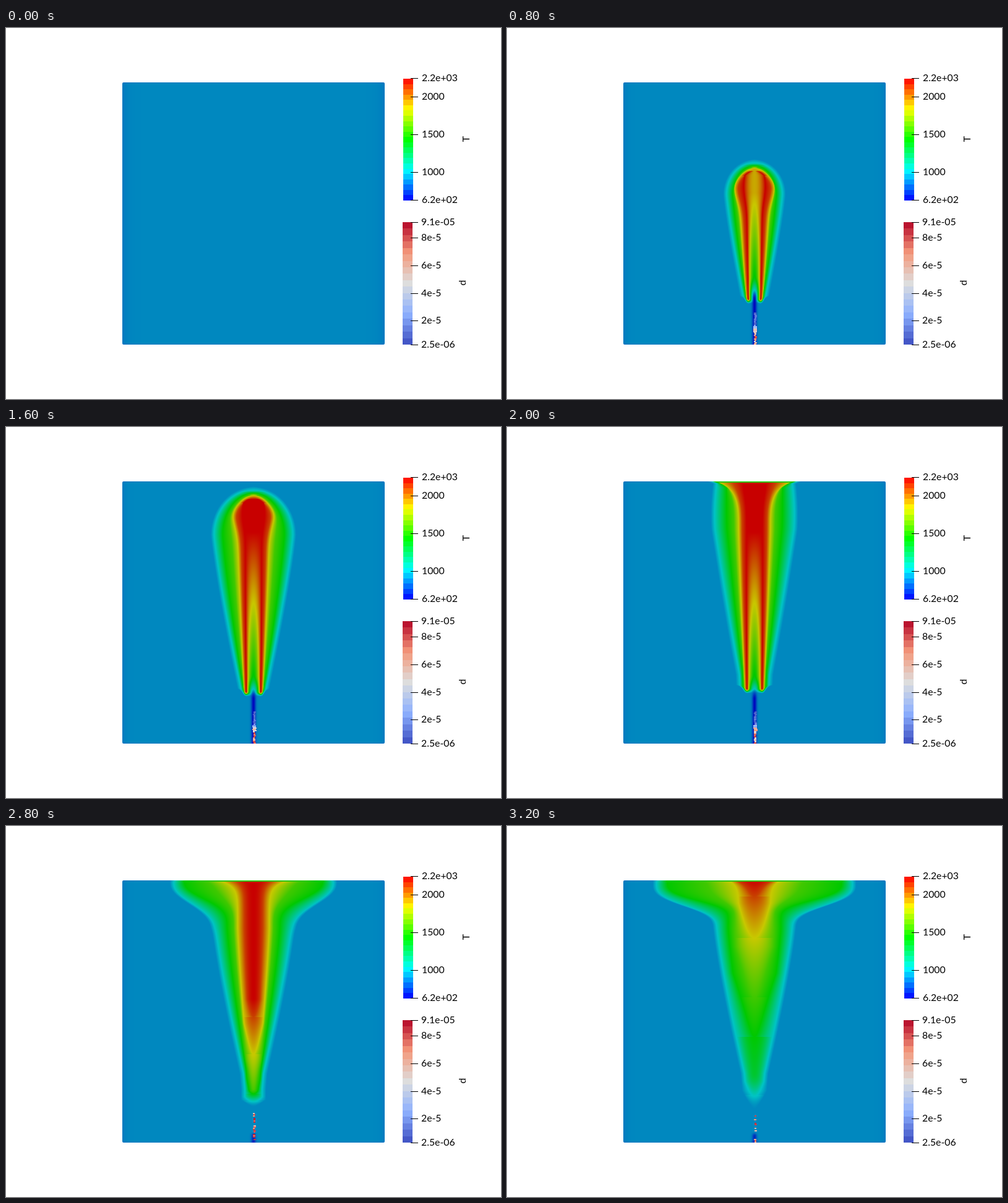
These frames come from a looping animation (800x600 px, 3.4 s). An HTML page with a canvas:

```html
<!DOCTYPE html>
<html lang="en">
<head>
<meta charset="utf-8">
<title>Flame temperature</title>
<style>
  html, body { margin: 0; width: 100%; height: 100%; overflow: hidden; background: #fff; }
  canvas { position: absolute; left: 188px; top: 88px; border-radius: 2px; }
  svg { position: absolute; left: 0; top: 0; }
  text { font: 15.8px Lato, "Open Sans", sans-serif; fill: #000; }
</style>
</head>
<body>
<canvas id="field" width="424" height="424"></canvas>
<svg id="legend" width="800" height="600"></svg>
<script>
const STEP = 200, COUNT = 17, SIZE = 424, LEFT = 188, TOP = 88, BG = 0.17;
const WALL = 9, LIFT = 14; // steps at which the flame meets the wall and leaves the jet

const clamp = (v, a = 0, b = 1) => Math.min(b, Math.max(a, v));
const lerp = (a, b, f) => a + (b - a) * f;
const smooth = (a, b, v) => { const f = clamp((v - a) / (b - a)); return f * f * (3 - 2 * f); };

function interp(xs, ys, x) {
  if (x <= xs[0]) return ys[0];
  for (let i = 1; i < xs.length; i++)
    if (x < xs[i]) return lerp(ys[i - 1], ys[i], (x - xs[i - 1]) / (xs[i] - xs[i - 1]));
  return ys[ys.length - 1];
}

const ramp = (at, colors) => v => [0, 1, 2].map(c => interp(at, colors.map(p => p[c]), v));
const heat = ramp([0, BG, 0.25, 0.5, 0.75, 1],
  [[0, 0, 190], [0, 136, 191], [0, 196, 196], [0, 200, 0], [200, 200, 0], [200, 0, 0]]);
const quarters = [0, 0.25, 0.5, 0.75, 1];
const rainbow = ramp(quarters, [[0, 0, 255], [0, 255, 255], [0, 255, 0], [255, 255, 0], [255, 0, 0]]);
const coolWarm = ramp(quarters, [[59, 76, 192], [141, 176, 254], [221, 221, 221], [244, 152, 122], [180, 4, 38]]);
const css = rgb => `rgb(${rgb.map(Math.round).join(",")})`;
const heatTable = Array.from({ length: 1001 }, (_, i) => heat(i / 1000));

// The rising tip slows down, then carries on past the wall at a steady pace
function tipAt(k) {
  const rise = n => 1 - Math.exp(-0.2 * n);
  return 391 - 289 * rise(Math.min(k, 8) - 1) / rise(7) - 25 * Math.max(0, k - 8);
}

// Value along the axis: falls towards the nozzle, burns out at the end
function axisValue(k, y) {
  const fall = (from, slope, a, b) =>
    lerp(Math.min(1, 1 - (y - from) * slope), BG, smooth(a, b, y));
  if (k < 13) return Math.min(fall(170, 0.00217, 402, 436), 0.55 + 0.06 * k);
  if (k < LIFT) return fall(200, 0.002, 402, 450);
  const burnt = lerp(0.25 + 0.75 * Math.exp((TOP - y) / 230), BG, smooth(400, 460, y));
  return lerp(fall(280, 0.0028, 425, 455), burnt, (k - LIFT) / 2);
}

function cap(y, tip, mid) {
  if (y >= mid) return 1;
  return y <= tip ? 0 : Math.sqrt(1 - ((mid - y) / (mid - tip)) ** 2);
}

// Cross-section of the flame at height y, as distance and value pairs
function section(k, y) {
  const lifted = k >= LIFT, W = k < WALL ? 22.3 * Math.sqrt(k) : 60;
  const tip = tipAt(k);
  const wide = Math.max(tip + 1.15 * W, k < WALL ? 0 : 165);
  const base = lifted ? 425 : Math.max(424, 450 - 2.5 * k);
  const prong = Math.min(12, 7.5 + 0.5 * k);
  const foot = lifted ? 3 : prong;
  const f = clamp((y - wide) / (base - wide)) ** 1.2;
  const head = tip + Math.min(48, W);

  const bulge = Math.min(8, 0.18 * W) * Math.exp(-(((y - tip - 38) / 30) ** 2));
  let red = lerp(Math.min(20, 0.42 * W), foot + 1.5, f) + bulge;
  let yellow = red + lerp(5.5, 2, f);
  let green = lerp((k < WALL ? 0.79 : 0.71) * W, foot + 4, f);
  let cyan = lerp(W, foot + 7, f);
  const inner = red * lerp(0.65, 0.87, f);

  red *= cap(y, tip + 13, head);
  yellow *= cap(y, tip + 9, head);
  green *= cap(y, tip + 5, wide);
  let outer = (cyan + 6) * cap(y, tip - 5, wide);
  cyan *= cap(y, tip, wide);

  if (k >= WALL) {
    const spread = 14 * (k - WALL) + 2, d = y - TOP, n = clamp(0.5 * k - 4.5, 1, 3.5);
    const near = Math.exp(-d / 9);
    red += 5 * Math.min(4, k - 8) * near;
    yellow += 58 * Math.exp(-Math.abs(k - 12) * 0.32) * near;
    green = Math.max(green + spread * Math.exp(-((d / 36) ** n)), yellow + 3);
    cyan = Math.max(cyan + spread * Math.exp(-((d / 46) ** n)), green + 4);
    outer = cyan + 7;
  }

  const limit = interp([tip - 6, tip + 1, tip + 5, tip + 9, tip + 15], [BG, 0.26, 0.5, 0.75, 1], y);
  const mid = Math.min(axisValue(k, y), limit);
  const peak = lifted ? mid : limit;
  const xs = [0], vs = [mid];
  const add = (x, v) => {
    if (x > xs[xs.length - 1] + 0.05) { xs.push(x); vs.push(v); }
  };
  if (!lifted) add(Math.min(inner, red), peak);
  const pale = lerp(yellow, green, 0.4);
  for (const [x, level] of [[red, 0.92], [yellow, 0.75], [pale, 0.58], [green, 0.5], [cyan, 0.26], [outer, BG]]) {
    if (level < peak) add(lifted ? x * Math.min(1, Math.sqrt((mid - level) / 0.14)) : x, level);
  }
  add(xs[xs.length - 1] + 1, BG);

  return x => {
    const v = x < xs[1] ? lerp(vs[0], vs[1], (x / xs[1]) ** 2) : interp(xs, vs, x);
    if (lifted) return v;
    const round = 0.12 * Math.max(0, x - prong) ** 2;
    return y < base - 12 ? v : lerp(v, BG, smooth(base - 2, base + 6, y + round * smooth(base - 12, base, y)));
  };
}

// Cold fuel jet below the flame
function jet(k, y) {
  if (k < LIFT) return (k < 13 ? 0.16 : 0.1) * smooth(422, 440, y);
  return 0.12 * smooth(494, 502, y);
}

const ctx = document.getElementById("field").getContext("2d");
const image = ctx.createImageData(SIZE, SIZE);

function drawField(k) {
  const half = SIZE / 2, rim = k ? 5 : 8;
  for (let row = 0; row < SIZE; row++) {
    const y = row + TOP + 0.5;
    const flame = k ? section(k, y) : () => BG, cold = k ? jet(k, y) : 0;
    const edge = row === 0 || row === SIZE - 1 ? 0.025 : 0;
    for (let i = 0; i < half; i++) {
      const x = i + 0.5;
      let v = flame(x) - cold * Math.exp(-((x / 3.6) ** 2));
      if (k >= WALL && row < 2) v = Math.min(v, 0.56);
      v -= edge + 0.022 * Math.exp((x - half) / rim);
      const rgb = heatTable[Math.round(clamp(v) * 1000)];
      for (const col of [half + i, half - 1 - i])
        image.data.set([...rgb, 255], (row * SIZE + col) * 4);
    }
  }
  ctx.putImageData(image, 0, 0);
}

function seeded(seed) {
  return () => {
    seed = (seed * 1664525 + 1013904223) >>> 0;
    return seed / 4294967296;
  };
}

// Droplets shrink as they climb; once the flame lifts only large, sparse ones remain
function drawDrops(k) {
  if (!k) return;
  const rnd = seeded(k * 7919 + 5), late = k >= 13;
  for (let y = 510; y >= (late ? 463 : 459); y -= 2) {
    const z = (512 - y) / 54, a = rnd(), b = rnd();
    const small = smooth(0.38, 0.65, z);
    const d = late ? 0.6 + 0.38 * a : lerp(0.45 + 0.5 * a, 0.03 + 0.1 * a, small);
    const w = Math.round(!late && z > 0.4 && z < 0.58 ? 6 : 3 + 1.5 * b);
    if (late && rnd() < 0.12 * (k - 12)) continue;
    ctx.fillStyle = css(coolWarm(d));
    ctx.fillRect(Math.round(401.3 - w / 2 + rnd() - 0.5) - LEFT, y - TOP, w, 2);
  }
}

const svg = document.getElementById("legend");
function put(tag, attrs, label) {
  const el = document.createElementNS("http://www.w3.org/2000/svg", tag);
  for (const name in attrs) el.setAttribute(name, attrs[name]);
  if (label) el.textContent = label;
  svg.append(el);
}

function scale({ x, top, height, bands, color, ticks, title, titleX }) {
  for (let i = 0; i < bands; i++) {
    const y = Math.round(top + height * i / bands), end = Math.round(top + height * (i + 1) / bands);
    put("rect", { x, y, width: 16, height: end - y, fill: css(color(1 - (i + 0.5) / bands)) });
  }
  for (const [label, y] of Object.entries(ticks)) {
    put("rect", { x: 654, y, width: 12, height: 1 });
    put("text", { x: x + 30, y: y + 4.5 }, label);
  }
  const middle = top + height / 2 - 1;
  put("text", { transform: `translate(${titleX} ${middle}) rotate(-90)`, "text-anchor": "middle" }, title);
}

scale({
  x: 642, top: 82, height: 197, bands: 23, color: rainbow, title: "T", titleX: 749,
  ticks: { "2.2e+03": 81, "2000": 111, "1500": 172, "1000": 233, "6.2e+02": 278 }
});
scale({
  x: 641, top: 314, height: 198, bands: 19, color: coolWarm, title: "d", titleX: 743,
  ticks: { "9.1e-05": 314, "8e-5": 339, "6e-5": 384, "4e-5": 429, "2e-5": 473, "2.5e-06": 512 }
});

const start = performance.now();
let shown = -1;
function tick() {
  const k = Math.floor((performance.now() - start) / STEP) % COUNT;
  if (k !== shown) {
    shown = k;
    drawField(k);
    drawDrops(k);
  }
  requestAnimationFrame(tick);
}
tick();
</script>
</body>
</html>
```
